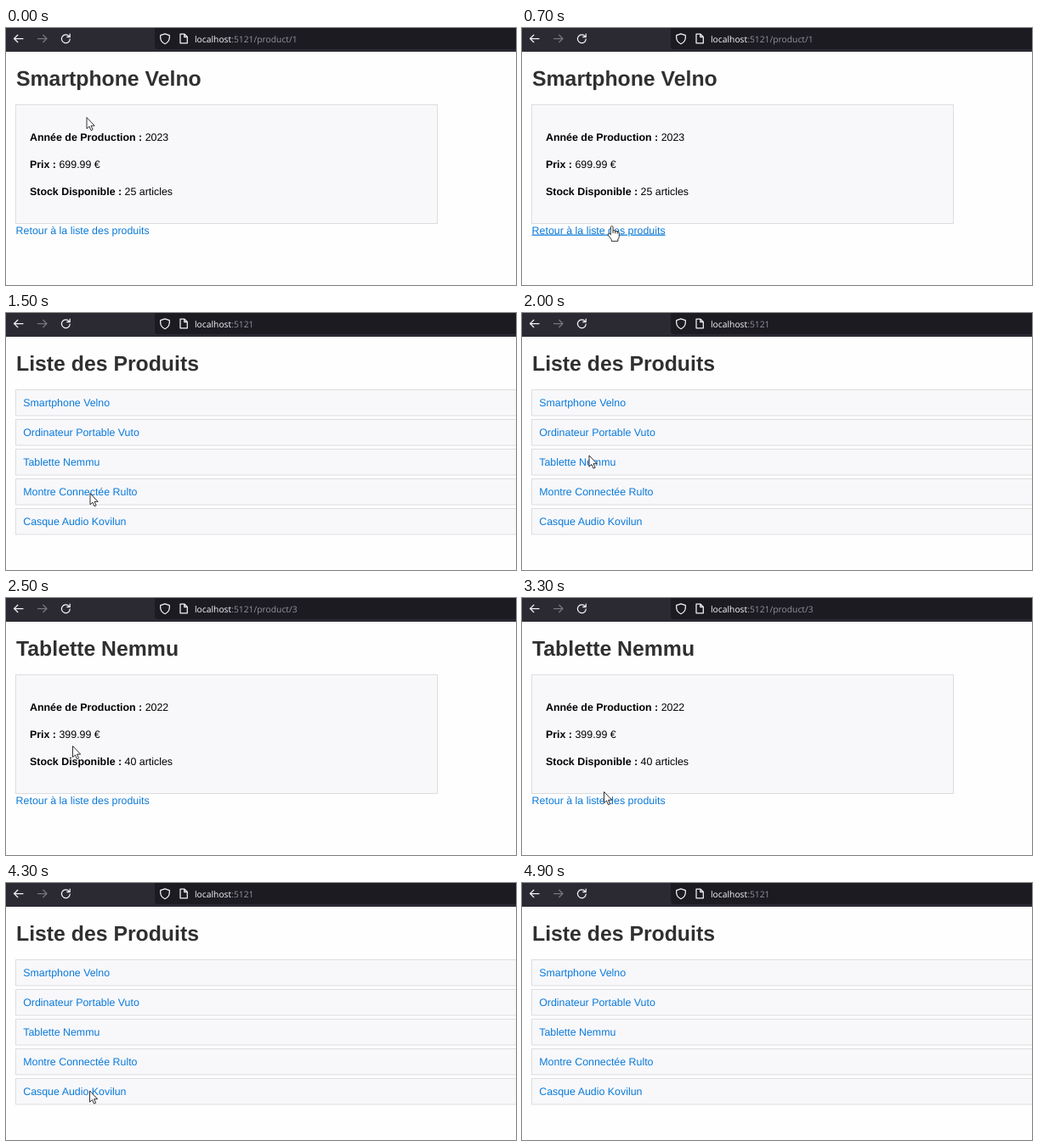
Recreate the animation shown at these times as an HTML page. Size 600x303 px, loop 5000 ms.

```html
<!DOCTYPE html>
<html lang="fr">
<head>
<meta charset="utf-8">
<title>Liste des Produits</title>
<style>
html, body { margin: 0; width: 100%; height: 100%; overflow: hidden; background: #fefefe; }
svg { display: block; width: 100vw; height: 100vh; }
text { font-family: "Liberation Sans", Arial, sans-serif; font-size: 12.4px; text-rendering: geometricPrecision; }
.title { font-size: 24.8px; font-weight: bold; fill: #303030; }
.url { font-family: "Open Sans", "Noto Sans", sans-serif; font-size: 10.3px; fill: #fbfbfe; }
.url .dim { fill: #94939d; }
.b { font-weight: bold; }
.link { fill: #0b7ad9; }
.hover { text-decoration: underline; }
.card { fill: #f8f8fb; stroke: #dcdde0; }
.icon { fill: none; stroke: #f4f4f8; stroke-width: 1.25; stroke-linecap: round; stroke-linejoin: round; }
.off { stroke: #77767f; }
.cursor { fill: #fff; stroke: #1a1a1a; stroke-width: .9; stroke-linejoin: round; }
</style>
</head>
<body>
<svg viewBox="0 0 600 303">
  <rect width="600" height="303" fill="#fefefe"/>
  <rect width="600" height="28" fill="#2b2a33"/>
  <path d="M600 0H175V21.500Q175 25 178.500 25H600Z" fill="#1c1b22"/>
  <path class="icon" d="M20 12.500H9.500M13.800 8.300L9.500 12.500L13.800 16.700"/>
  <path class="icon off" d="M37.500 12.500H48M43.700 8.300L48 12.500L43.700 16.700"/>
  <path class="icon" d="M74.200 9.800A4.900 4.900 0 1 0 75.200 13.200M75.200 7V10.500H71.700"/>
  <path class="icon" d="M187 6.800L192.300 8.700V11.500Q192 16.500 187 18.700Q182 16.500 181.700 11.500V8.700Z"/>
  <path class="icon" d="M205 7.200H210L213.300 10.500V17.800H205ZM209.800 7.400V10.700H213"/>
  <text class="url" x="222" y="16.800">localhost<tspan class="dim" id="path"></tspan></text>
  <text class="title" id="title" x="12" y="68"></text>
  <g id="list"></g>
  <g id="detail">
    <rect class="card" x="11.500" y="90.500" width="496" height="140"/>
    <text x="28" y="133"><tspan class="b">Année de Production :</tspan> <tspan id="year"></tspan></text>
    <text x="28" y="165"><tspan class="b">Prix :</tspan> <tspan id="price"></tspan></text>
    <text x="28" y="197"><tspan class="b">Stock Disponible :</tspan> <tspan id="stock"></tspan></text>
    <text class="link" id="back" x="11.600" y="242.500">Retour à la liste des produits</text>
  </g>
  <path class="cursor" id="arrow" d="M0 0V13.200L3 10.500L5 15.200L7.100 14.300L5.100 9.700H9.200Z"/>
  <g class="cursor" id="hand">
    <path d="M-1.400 1.400Q0 -.8 1.400 1.400V6Q2.900 5 4 6.500Q5.500 5.600 6.500 7.200Q8.600 6.800 8.600 9V12.500Q8.600 14.500 7.200 16V18.300H-.4V16.500L-4.300 11.200Q-4.900 9.200 -3.100 9L-1.400 10.600Z"/>
    <path d="M1.400 6V9M4 6.500V9.300M6.500 7.200V9.600" fill="none"/>
  </g>
</svg>
<script>
const $ = id => document.getElementById(id);
const LOOP = 5000, STEP = 100;

const names = ["Smartphone Velno", "Ordinateur Portable Vuto", "Tablette Nemmu",
  "Montre Connectée Rulto", "Casque Audio Kovilun"];
const details = {
  1: ["2023", "699.99 €", "25 articles"],
  3: ["2022", "399.99 €", "40 articles"]
};

// start time, product id (0 = list)
const pages = [[0, 1], [1300, 0], [2400, 3], [4300, 0]];
// spans where the pointer rests on a link
const hovers = [[600, 1300], [2100, 2400], [3400, 4300]];
// time, x, y
const track = [
  [0, 95, 105.5], [100, 98, 166], [200, 98, 228], [500, 98, 228], [600, 104, 232],
  [900, 109, 235], [1300, 109, 235], [1900, 79, 168], [2000, 79, 168], [2200, 78.5, 174.5],
  [2800, 78.5, 174.5], [3300, 96.5, 228.5], [3500, 98.5, 245], [4300, 98.5, 245],
  [4700, 90, 164], [4800, 202, 62], [LOOP, 202, 62]
];

$("list").innerHTML = names.map((name, i) => {
  const y = 90.5 + Math.round(i * 35.1);
  return `<rect class="card" x="11.5" y="${y}" width="600" height="30.5"/>
    <text class="link" x="20.200" y="${y + 19.2}">${name}</text>`;
}).join("");
const links = $("list").querySelectorAll("text");

const show = (el, on) => { el.style.display = on ? "" : "none"; };

function pointer(t) {
  const i = track.findIndex(k => k[0] > t);
  const [t0, x0, y0] = track[i - 1], [t1, x1, y1] = track[i];
  const k = (t - t0) / (t1 - t0);
  return [x0 + (x1 - x0) * k, y0 + (y1 - y0) * k];
}

function draw(ms) {
  const t = Math.floor((ms % LOOP) / STEP) * STEP;
  const id = pages.filter(p => p[0] <= t).pop()[1];
  const over = hovers.some(([a, b]) => t >= a && t < b);
  const visible = t < 4900;

  $("path").textContent = ":5121" + (id ? "/product/" + id : "");
  $("title").textContent = id ? names[id - 1] : "Liste des Produits";
  show($("list"), !id);
  show($("detail"), id);
  if (id) ["year", "price", "stock"].forEach((key, i) => { $(key).textContent = details[id][i]; });
  $("back").classList.toggle("hover", over);
  links[2].classList.toggle("hover", over);

  const [x, y] = pointer(t);
  for (const [name, on] of [["arrow", !over], ["hand", over]]) {
    show($(name), visible && on);
    $(name).setAttribute("transform", `translate(${x} ${y})`);
  }
}

const start = performance.now();
function tick() {
  draw(performance.now() - start);
  requestAnimationFrame(tick);
}
tick();
</script>
</body>
</html>
```
